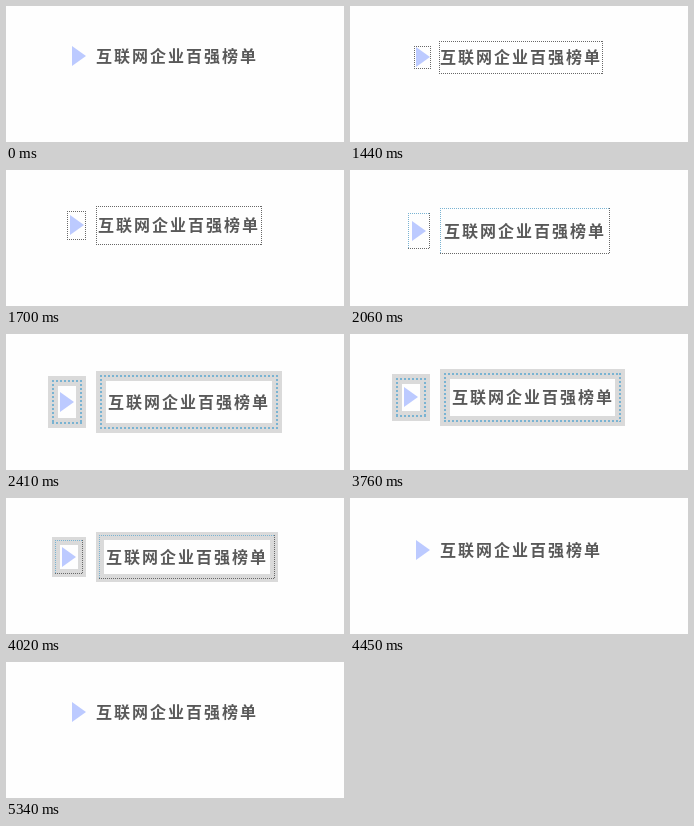
An HTML page for the animation above (5970 ms loop, 338x136 px).

```html
<!DOCTYPE html>
<html lang="zh">
<head>
<meta charset="utf-8">
<style>
  html, body { margin: 0; width: 100%; height: 100%; overflow: hidden; background: #fefefe; }
  svg { display: block; width: 100%; height: 100%; }
  text { font: 700 16px "Noto Sans CJK SC", "Noto Sans CJK", sans-serif; letter-spacing: 2px; fill: #595959; }
  .box { shape-rendering: crispEdges; fill: none; }
</style>
</head>
<body>
<svg viewBox="0 0 338 136">
  <g id="boxes" class="box"></g>
  <path id="arrow" d="M0-10L14 0L0 10Z" fill="#bccaff"/>
  <text id="title">互联网企业百强榜单</text>
</svg>
<script>
const LOOP = 5970, STEP = 88.4, GROW = 1440, SHRINK = 3490;
const TEXT_W = 161.5, TEXT_H = 31, ARROW_W = 14;
const BLUE = '#79b3d2', DARK = '#686868', GREY = '#dadada';
const $ = id => document.getElementById(id);
const boxes = $('boxes'), arrow = $('arrow'), title = $('title');
const lerp = (a, b, k) => a + (b - a) * Math.max(0, Math.min(1, k));

// Box metrics: band = border width, px/py = padding, top = outer top edge.
function growing(i) {
  const p = i / 7, b = (i - 7) / 4;
  if (i < 7) return {
    band: 1, px: lerp(0.3, 2.6, p), py: lerp(0, 6.5, p),
    top: lerp(35, 38, p), out: i ? 0 : 1, first: DARK, last: DARK
  };
  return {
    band: lerp(1, 10, b), px: lerp(3, 2, b), py: lerp(6.5, 5.5, b),
    top: lerp(38, 37, b), out: 0, first: BLUE, last: b < 0.5 ? DARK : BLUE
  };
}

function shrinking(i) {
  const p = i / 6, b = (i - 6) / 5;
  if (i < 6) return {
    band: 10, px: lerp(2, 1.6, p), py: lerp(5, 1.5, p),
    top: lerp(37, 33, i / 5), out: 0, first: BLUE, last: BLUE
  };
  return {
    band: lerp(8, 0, b), px: lerp(2, 0.6, b), py: lerp(1.5, 0.5, b),
    top: lerp(34, 37.5, b), out: 0, first: BLUE, last: DARK
  };
}

function state(t) {
  const index = start => Math.max(0, Math.floor((t - start + 15) / STEP));
  if (t < GROW) return { cy: 50 };
  if (t < SHRINK) return growing(Math.min(11, index(GROW)));
  if (t < 4450) return shrinking(Math.min(10, index(SHRINK)));
  return { cy: t < 5080 ? 52 : t < 5340 ? 51 : 50 };
}

function frame(x0, y0, x1, y1, s) {
  const band = Math.max(1, Math.round(s.band));
  const line = band >= 9 ? 2 : 1;
  const h = band / 2;
  let svg = '';
  if (band > 1) {
    svg += `<rect x="${x0 + h}" y="${y0 + h}" width="${x1 - x0 - band}" height="${y1 - y0 - band}" stroke="${GREY}" stroke-width="${band}"/>`;
  }
  const m = Math.floor((band - line) / 2) + line / 2;
  const [l, t, r, b] = [x0 + m, y0 + m, x1 - m, y1 - m];
  const e = line / 2;
  const dots = (d, color) =>
    `<path d="${d}" stroke="${color}" stroke-width="${line}" stroke-dasharray="${line}"/>`;
  return svg
    + dots(`M${l - e} ${t}H${r + e}M${l} ${t - e}V${b + e}`, s.first)
    + dots(`M${r} ${t - e}V${b + e}M${l - e} ${b}H${r + e}`, s.last);
}

function draw(t) {
  const s = state(t);
  let cy = s.cy, inset = 0, svg = '';
  if (!cy) {
    const edge = s.band + s.px, out = s.out;
    const top = Math.round(s.top);
    const bottom = Math.round(s.top + TEXT_H + 2 * (s.band + s.py));
    const left = 90 - out, right = 80 + out;
    inset = Math.round(edge) - out;
    cy = Math.floor((top + bottom) / 2);
    svg = frame(left, top, Math.round(left + TEXT_W + 2 * edge), bottom, s)
      + frame(Math.round(right - ARROW_W - 2 * edge), top + 5, right, bottom - 5, s);
  }
  boxes.innerHTML = svg;
  arrow.setAttribute('transform', `translate(${66 - inset} ${cy})`);
  title.setAttribute('x', 90 + inset);
  title.setAttribute('y', cy + 6);
}

let begin;
function tick(now) {
  begin ??= now;
  draw((now - begin) % LOOP);
  requestAnimationFrame(tick);
}
draw(0);
requestAnimationFrame(tick);
</script>
</body>
</html>
```
